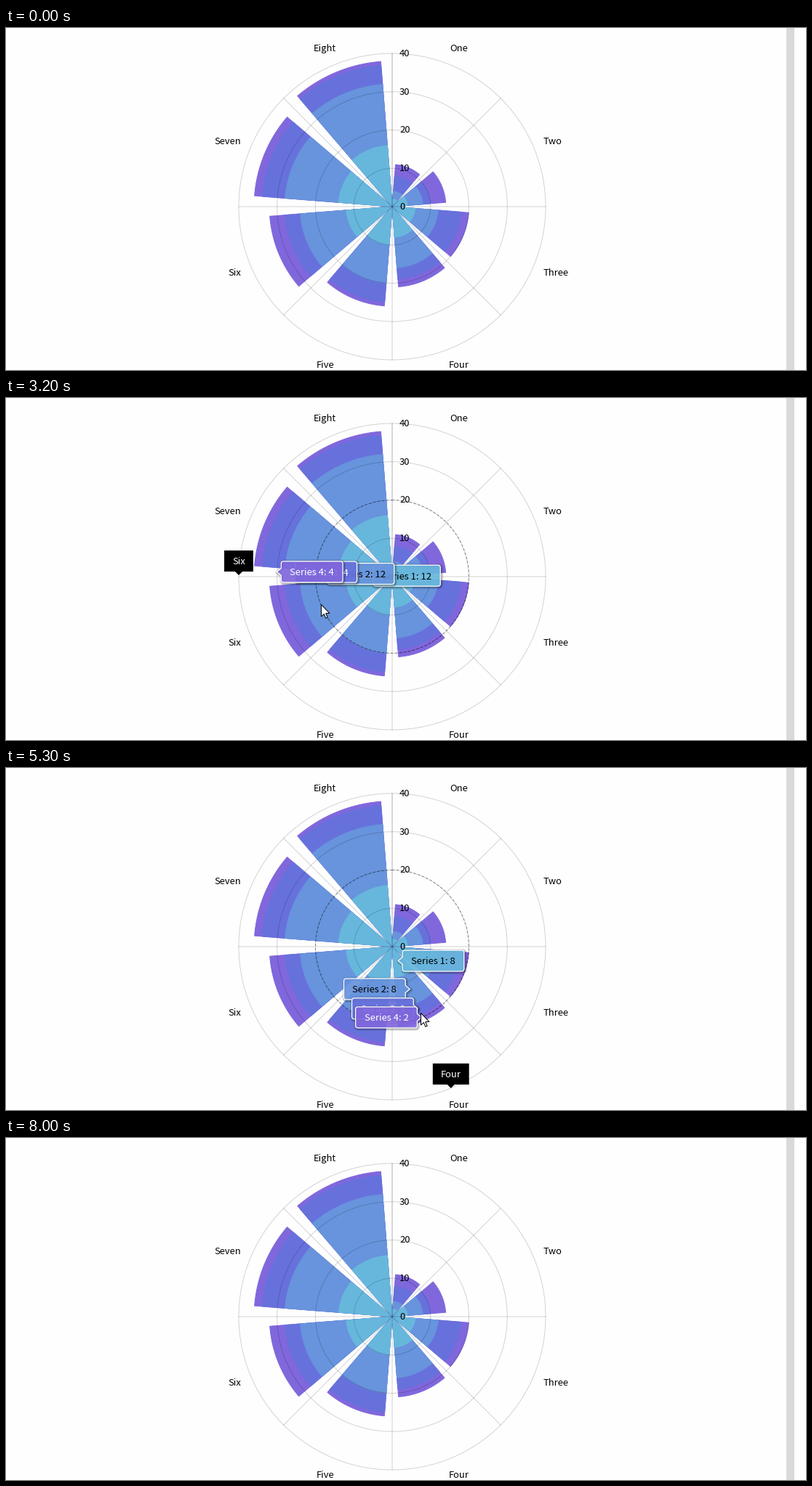
A matplotlib script for the animation above (8.4 s loop, 1100 px wide and 471 px high).

```python
import matplotlib.pyplot as plt
import numpy as np
from matplotlib.animation import FuncAnimation
from matplotlib.patches import Circle, Polygon, Rectangle

W, H, DPI = 1100, 471, 100
STEP, FRAMES = 100, 84
PX = 72 / DPI                      # points per pixel
CX, CY, RADIUS = 531, 246, 211
UNIT = RADIUS / 40
FLIP_X = 547                       # series tooltips right of this open leftwards
SLIDE = 400                        # tooltip travel time, ms
COLORS = ["#67b7dc", "#6794dc", "#6771dc", "#8067dc"]
NAMES = ["One", "Two", "Three", "Four", "Five", "Six", "Seven", "Eight"]

RAMP = 2 * np.arange(1, 9)
VALUES = np.column_stack([RAMP, RAMP, [4, 2, 6, 3, 5, 4, 6, 5], [3, 4, 2, 2, 1, 4, 2, 1]])
TOPS = VALUES.cumsum(axis=1)
MIDDLES = TOPS - VALUES / 2

# key points of the pointer path: time, x, y
PATH = np.array([
    (100, 920, 84), (400, 596, 85), (500, 520, 92), (700, 496, 93),
    (800, 489, 84), (1100, 478, 70), (1400, 478, 70), (1900, 429, 135),
    (2000, 406, 155), (2400, 412, 163), (2500, 412, 163), (3100, 426, 237),
    (3200, 433, 284), (3900, 429, 282), (4400, 528, 346), (4600, 531, 345),
    (4850, 558, 373), (5300, 570, 337), (5500, 570, 337), (6100, 597, 250),
    (6200, 595, 232), (6900, 556, 190), (7200, 556, 190), (7500, 655, 150),
    (7900, 1096, 146),
])

plt.rcParams["font.family"] = "Noto Sans CJK JP"
plt.rcParams["font.size"] = 13 * PX

fig = plt.figure(figsize=(W / DPI, H / DPI), dpi=DPI, facecolor="#fefefe")
ax = fig.add_axes([0, 0, 1, 1])
ax.set_xlim(0, W)
ax.set_ylim(H, 0)
ax.axis("off")


def polar(r, deg):
    """Screen point at radius r, angle clockwise from the top."""
    a = np.radians(deg)
    return np.stack([CX + r * np.sin(a), CY - r * np.cos(a)], axis=-1)


def middle_angle(cat):
    return 45 * cat + 22.5


def pointer_at(t):
    return np.stack([np.interp(t, PATH[:, 0], PATH[:, i]) for i in (1, 2)], axis=-1)


def distance(t):
    """Pointer's distance from the chart's centre."""
    x, y = pointer_at(t)
    return np.hypot(x - CX, y - CY)


def find_hovers():
    """Times at which the pointer enters a new sector, with the sector."""
    hovers = []
    for t, (x, y) in enumerate(pointer_at(np.arange(FRAMES * STEP))):
        if np.hypot(x - CX, y - CY) > RADIUS:
            continue
        cat = int(np.degrees(np.arctan2(x - CX, CY - y)) % 360 // 45)
        if not hovers or hovers[-1][1] != cat:
            hovers.append((t, cat))
    return hovers


HOVERS = find_hovers()


def hover_state(t):
    """Previous category, current category and eased progress between them."""
    i = max(n for n, (start, _) in enumerate(HOVERS) if start <= t)
    start, cat = HOVERS[i]
    old = HOVERS[max(i - 1, 0)][1]
    x = min((t - start) / SLIDE, 1)
    return old, cat, 1 - (1 - x) ** 3


def label(x, y, text, ha="center", color="black", z=8):
    return ax.text(x, y + 4.8, text, ha=ha, va="baseline", color=color, zorder=z)


def draw_columns():
    for cat, tops in enumerate(TOPS):
        arc = np.linspace(45 * cat + 4.5, 45 * cat + 40.5, 50)
        for top, color in reversed(list(zip(tops, COLORS))):
            points = np.vstack([polar(top * UNIT, arc), [(CX, CY)]])
            ax.add_patch(Polygon(points, fc=color, ec=color, lw=PX,
                                 joinstyle="round", zorder=2))


def spoke(deg, alpha):
    x, y = polar(RADIUS, deg)
    ax.plot([CX, x], [CY, y], color="black", alpha=alpha, lw=PX, snap=False, zorder=3)


def draw_grid():
    for value in (10, 20, 30, 40):
        ax.add_patch(Circle((CX, CY), value * UNIT, fill=False, ec=(0, 0, 0, 0.17),
                            lw=PX, zorder=3))
    for deg in range(0, 360, 45):
        spoke(deg, 0.17)
    spoke(0, 0.14)


def draw_labels():
    for value in range(0, 41, 10):
        label(CX + 10, CY - value * UNIT - 1, str(value), "left")
    for cat, name in enumerate(NAMES):
        x, y = polar(236, middle_angle(cat)) - 0.5
        side = 1 if x > CX else -1
        if abs(x - CX) > 150:
            label(CX + side * 208, y, name, "left" if side > 0 else "right")
        else:
            label(CX - 0.5 + side * 91.7, y, name)


def bubble(width, side, height=29, r=3, gap=6):
    """Outline of a rounded box whose arrow tip sits at the origin."""
    h = height / 2
    points = [(0, 0), (gap, -5)]
    corners = [(gap + r, r - h, 180), (gap + width - r, r - h, 270),
               (gap + width - r, h - r, 0), (gap + r, h - r, 90)]
    for x, y, start in corners:
        a = np.radians(np.linspace(start, start + 90, 5))
        points += list(zip(x + r * np.cos(a), y + r * np.sin(a)))
    points.append((gap, 5))
    return np.array(points) * (side, 1)


class SeriesTip:
    def __init__(self, k):
        self.k = k
        z = 10 + k
        self.shadows = [
            ax.add_patch(Polygon([(0, 0)], fill=False, ec=(0, 0, 0, 0.11), lw=w * PX,
                                 joinstyle="round", zorder=z))
            for w in (2, 4, 6)
        ]
        self.box = ax.add_patch(Polygon([(0, 0)], fc=COLORS[k], alpha=0.92, lw=0, zorder=z))
        self.edge = ax.add_patch(Polygon([(0, 0)], fill=False, ec="white", lw=1.3 * PX,
                                         zorder=z))
        self.text = label(0, 0, "", color="black" if k < 2 else "white", z=z)
        self.parts = self.shadows + [self.box, self.edge, self.text]

    def place(self, old, cat, p):
        start, end = (polar(MIDDLES[c, self.k] * UNIT, middle_angle(c)) for c in (old, cat))
        tip = start + (end - start) * p
        side = -1 if end[0] > FLIP_X else 1
        self.text.set_text(f"Series {self.k + 1}: {VALUES[cat, self.k]}")
        width = self.text.get_window_extent().width + 24
        self.text.set_position((tip[0] + side * (6 + width / 2), tip[1] + 5))
        points = bubble(width, side) + tip
        self.box.set_xy(points)
        self.edge.set_xy(points)
        for shadow in self.shadows:
            shadow.set_xy(points + 1)


class CategoryTip:
    def __init__(self):
        self.box = ax.add_patch(Polygon([(0, 0)], fc="black", lw=0, zorder=9))
        self.text = label(0, 0, "", color="white", z=9)
        self.parts = [self.box, self.text]

    def place(self, old, cat, p):
        a, b = middle_angle(old), middle_angle(cat)
        turn = (b - a + 180) % 360 - 180
        tip = polar(RADIUS, a + turn * p)
        self.text.set_text(NAMES[cat])
        self.text.set_position((tip[0], tip[1] - 14.8))
        w = self.text.get_window_extent().width / 2 + 11
        shape = [(0, 0), (-5, -5), (-w, -5), (-w, -34), (w, -34), (w, -5), (5, -5)]
        self.box.set_xy(np.array(shape) + tip)


ax.add_patch(Rectangle((1073, 0), 11, H, fc="#d9d9d9", lw=0))
draw_columns()
draw_grid()
draw_labels()

ring = ax.add_patch(Circle((CX, CY), 1, fill=False, ec=(0, 0, 0, 0.42), lw=PX,
                           ls=(0, (3, 3)), zorder=4))
tips = [CategoryTip()] + [SeriesTip(k) for k in range(4)]
tip_parts = [part for tip in tips for part in tip.parts]

ARROW = np.array([(0, 0), (0, 16.5), (3.8, 13), (6.3, 18.8), (8.7, 17.7),
                  (6.2, 12), (11.5, 12)]) + 0.5
arrow = ax.add_patch(Polygon(ARROW, fc="white", ec="black", lw=PX, zorder=30))


def update(frame):
    t = frame * STEP
    arrow.set_visible(PATH[0, 0] <= t <= PATH[-1, 0])
    arrow.set_xy(ARROW + pointer_at(t))

    # the ring trails the pointer by one step
    r = distance(t - STEP)
    ring.set_visible(r <= RADIUS)
    ring.set_radius(r)

    active = distance(t) <= RADIUS
    for part in tip_parts:
        part.set_visible(active)
    if active:
        state = hover_state(t)
        for tip in tips:
            tip.place(*state)
    return tip_parts + [ring, arrow]


anim = FuncAnimation(fig, update, frames=FRAMES, interval=STEP, repeat=True,
                     repeat_delay=0, blit=False)
plt.show()
```
